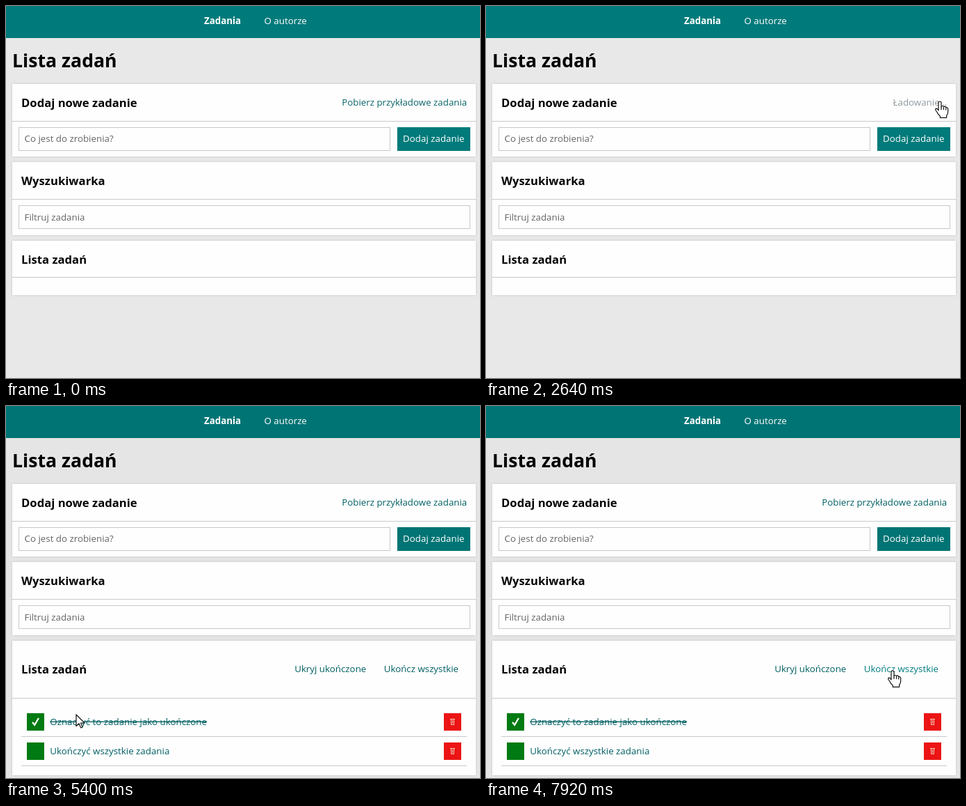
These frames come from a looping animation (682x534 px, 8 s). An HTML page:

```html
<!DOCTYPE html>
<html lang="pl">
<head>
<meta charset="utf-8">
<title>Lista zadań</title>
<style>
  html, body { margin: 0; width: 100%; height: 100%; overflow: hidden; background: #e7e7e7; }
  svg { display: block; --teal: #007a7a; --link: #0a6468; --page: #e8e8e8; }
  svg.loaded { --teal: #007474; --link: #005f63; --page: #e5e5e5; }
  text { font: 13.333px "Open Sans", sans-serif; fill: var(--link); white-space: pre; }
  .h1 { font-size: 26.667px; font-weight: 700; fill: #000; }
  .h2 { font-size: 16.667px; font-weight: 700; fill: #050505; }
  .nav, .button { fill: #fff; }
  .hint { fill: #666; }
  .end { text-anchor: end; }
  .hover { fill: #007c82; }
  .disabled { fill: #919aa0; }
  .done text { text-decoration: line-through; }
  .teal { fill: var(--teal); }
  .panel { fill: #fefefe; filter: drop-shadow(0 0 1.5px #c4c4c4); }
  .field { fill: #fefefe; stroke: #c8c8c8; }
  .line { stroke: #c9c9c9; }
  .tick { fill: none; stroke: #fff; stroke-width: 2.2; visibility: hidden; }
  .done .tick { visibility: visible; }
  .bin { fill: none; stroke: #f2c6b8; }
  .cursor path { fill: #fff; stroke: #111; stroke-width: 1.2; stroke-linejoin: round; }
</style>
</head>
<body>
<svg id="stage" width="682" height="534" viewBox="0 0 682 534">
  <defs>
    <g id="controls">
      <rect x="30" y="441" width="25" height="25" fill="#007a12"/>
      <rect x="630" y="441" width="25" height="25" fill="#ec1414"/>
      <path class="bin" d="M639 449.5h7M640.5 450v7.5h4V450M642.5 451v5"/>
      <path class="line" d="M22 474.5H663"/>
    </g>
  </defs>
  <rect width="682" height="534" fill="var(--page)"/>
  <rect class="teal" width="682" height="46"/>
  <text class="nav" x="285" y="26" style="font-weight:700">Zadania</text>
  <text class="nav" x="371.5" y="26">O autorze</text>
  <text class="h1" x="9" y="87.5">Lista zadań</text>

  <rect class="panel" x="9" y="112" width="667" height="104"/>
  <text class="h2" x="22" y="145">Dodaj nowe zadanie</text>
  <text id="fetch" class="end" x="663.3" y="143"></text>
  <path class="line" d="M9 165.5H676"/>
  <rect class="field" x="18.5" y="174.5" width="534" height="33"/>
  <text class="hint" x="26.5" y="195">Co jest do zrobienia?</text>
  <rect class="teal" x="563" y="174" width="105" height="34"/>
  <text class="button" x="615.3" y="195" text-anchor="middle">Dodaj zadanie</text>

  <rect class="panel" x="9" y="224" width="667" height="105"/>
  <text class="h2" x="22" y="257">Wyszukiwarka</text>
  <path class="line" d="M9 277.5H676"/>
  <rect class="field" x="18.5" y="286.5" width="649" height="33"/>
  <text class="hint" x="26.5" y="308">Filtruj zadania</text>

  <rect id="listPanel" class="panel" x="9" y="337" width="667"/>
  <text id="listTitle" class="h2" x="22">Lista zadań</text>
  <path id="listLine" class="line" d="M9 .5H676"/>
  <g id="list">
    <text id="toggle" class="end" x="518.3" y="382"></text>
    <text id="finish" class="end" x="651" y="382">Ukończ wszystkie</text>
    <g id="first">
      <use href="#controls"/>
      <path class="tick" d="M38 454l3.2 3.8L47 448"/>
      <text x="63.3" y="458">Oznaczyć to zadanie jako ukończone</text>
    </g>
    <g id="second">
      <use href="#controls"/>
      <text x="63.3" y="458">Ukończyć wszystkie zadania</text>
    </g>
  </g>

  <g id="hand" class="cursor">
    <path d="M-2 2Q-2 0 0 0Q2 0 2 2V8Q2 6.5 3.7 6.5Q5.3 6.5 5.5 8Q6 7 7.3 7.2Q8.8 7.5 8.8 9Q9.5 8.4 10.5 8.8Q11.7 9.3 11.7 11V15Q11.7 18 9.7 20V23.3H.3V21Q-2.5 19 -4 15.5L-6 12.5Q-6.8 10.5 -5 10.2Q-3.5 10.2 -2 13Z"/>
    <path d="M2 8v4M5.5 8.5V12M8.8 9.5v3"/>
  </g>
  <g id="arrow" class="cursor"><path d="M0 0V16.5L4 12.8L6.7 19L9.2 18L6.6 12H12Z"/></g>
  <g id="beam" class="cursor"><path style="fill:none" d="M-3.5 -6.5H-1L0 -6L1 -6.5H3.5M0 -6V6.5M-3.5 7H-1L0 6.5L1 7H3.5"/></g>
</svg>
<script>
const LOOP = 8000;
const CLICK = { fetch: 1440, loaded: 2700, check: 4560, hide: 6600, show: 7380 };
const route = [
  [900, 692, 215], [1380, 653, 137], [2820, 653, 137], [4020, 34, 453],
  [5160, 34, 453], [6120, 460, 389], [6240, 460, 389], [6540, 479, 382],
  [7440, 479, 382], [7860, 585, 380], [8000, 585, 380]
];
const el = Object.fromEntries([...document.querySelectorAll("[id]")].map(n => [n.id, n]));

const show = (node, on) => { node.style.display = on ? "" : "none"; };
const inside = ([x, y], [left, top, right, bottom]) =>
  x >= left && x <= right && y >= top && y <= bottom;

function pointerAt(t) {
  const i = route.findIndex(([time]) => time > t);
  if (i < 1) return [750, 215];
  const [t0, x0, y0] = route[i - 1], [t1, x1, y1] = route[i];
  const u = (t - t0) / (t1 - t0), k = u * u * (3 - 2 * u);
  return [x0 + (x1 - x0) * k, y0 + (y1 - y0) * k];
}

function draw(t) {
  const loading = t >= CLICK.fetch && t < CLICK.loaded;
  const loaded = t >= CLICK.loaded;
  const hidden = t >= CLICK.hide && t < CLICK.show;
  const point = pointerAt(t);
  const overFetch = inside(point, [478, 122, 669, 156]);
  const overToggle = loaded && inside(point, [402, 360, 531, 402]);
  const overFinish = loaded && inside(point, [532, 360, 663, 402]);
  const overCheck = loaded && inside(point, [30, 441, 55, 466]);
  const overField = inside(point, [18, 286, 668, 320]) || inside(point, [18, 174, 553, 208]);

  el.stage.classList.toggle("loaded", loaded);
  el.fetch.textContent = loading ? "Ładowanie..." : "Pobierz przykładowe zadania";
  el.fetch.classList.toggle("disabled", loading);
  el.fetch.classList.toggle("hover", overFetch && !loading);

  el.listPanel.setAttribute("height", !loaded ? 78 : hidden ? 150 : 193);
  el.listTitle.setAttribute("y", loaded ? 384 : 370);
  el.listLine.setAttribute("transform", `translate(0 ${loaded ? 419 : 389})`);
  show(el.list, loaded);
  show(el.first, !hidden);
  el.first.classList.toggle("done", t >= CLICK.check);
  el.second.setAttribute("transform", `translate(0 ${hidden ? 0 : 42})`);
  el.toggle.textContent = hidden ? "Pokaż ukończone" : "Ukryj ukończone";
  el.toggle.classList.toggle("hover", overToggle);
  el.toggle.style.opacity = hidden ? 0.85 : 1;
  el.finish.classList.toggle("hover", overFinish);

  const kind = overFetch || overToggle || overFinish || overCheck ? "hand" : overField ? "beam" : "arrow";
  for (const name of ["hand", "beam", "arrow"]) {
    show(el[name], name === kind);
    el[name].setAttribute("transform", `translate(${point.map(Math.round).join(" ")})`);
  }
}

const start = performance.now();
function frame() {
  draw((performance.now() - start) % LOOP);
  requestAnimationFrame(frame);
}
frame();
</script>
</body>
</html>
```
